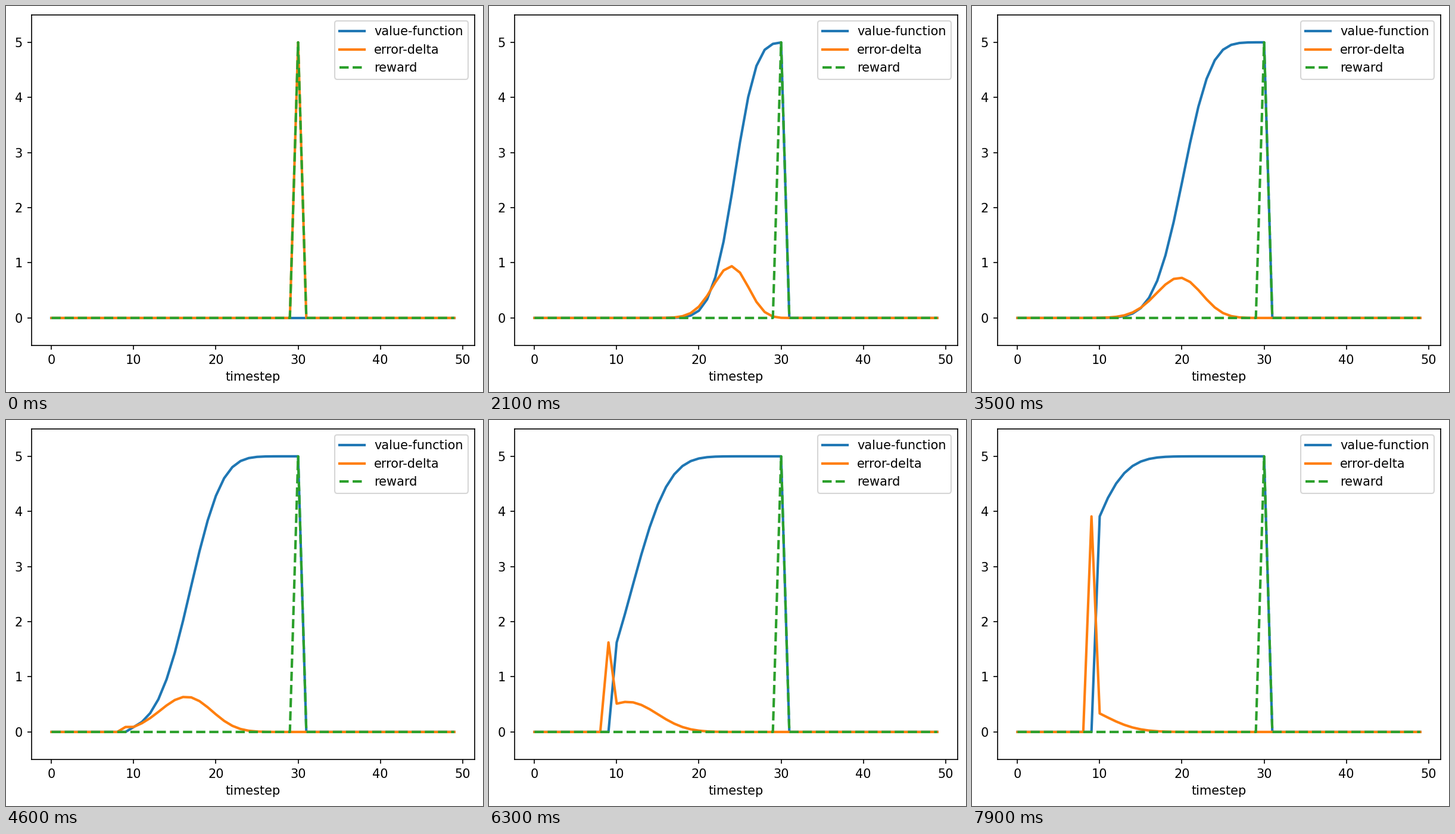
These frames come from a looping animation (801 by 647 pixels, 8000 ms). A matplotlib script:

```python
import numpy as np
import matplotlib.pyplot as plt
from matplotlib.animation import FuncAnimation

W, H, DPI = 801, 647, 150
STEPS, FRAMES, INTERVAL = 50, 80, 100
CUE, REWARD_AT, REWARD, RATE = 10, 30, 5.0, 0.3

plt.rcParams["font.family"] = "DejaVu Sans"

t = np.arange(STEPS)
reward = np.where(t == REWARD_AT, REWARD, 0.0)


def td_error(value):
    """Reward plus next value minus current value."""
    return reward + np.append(value[1:], 0.0) - value


def learn():
    """Value function before each trial; nothing is learned before the cue."""
    value = np.zeros(STEPS)
    history = []
    for _ in range(FRAMES):
        history.append(value)
        value = value + RATE * td_error(value) * (t >= CUE)
    return history


values = learn()

fig = plt.figure(figsize=((W + 0.01) / DPI, (H + 0.01) / DPI), dpi=DPI,
                 facecolor="white")
ax = fig.add_axes([42.583 / W, 77.917 / H, 744 / W, 554.4 / H])
value_line, = ax.plot(t, values[0], lw=2, label="value-function")
error_line, = ax.plot(t, td_error(values[0]), lw=2, label="error-delta")
ax.plot(t, reward, "--", lw=2, label="reward")
ax.set_xlim(-2.45, 51.45)
ax.set_ylim(-0.5, 5.5)
ax.set_xlabel("timestep")
ax.legend(loc="upper right")


def update(i):
    value_line.set_ydata(values[i])
    error_line.set_ydata(td_error(values[i]))
    return value_line, error_line


anim = FuncAnimation(fig, update, frames=FRAMES, interval=INTERVAL,
                     repeat=True, repeat_delay=0, blit=False)
plt.show()
```
